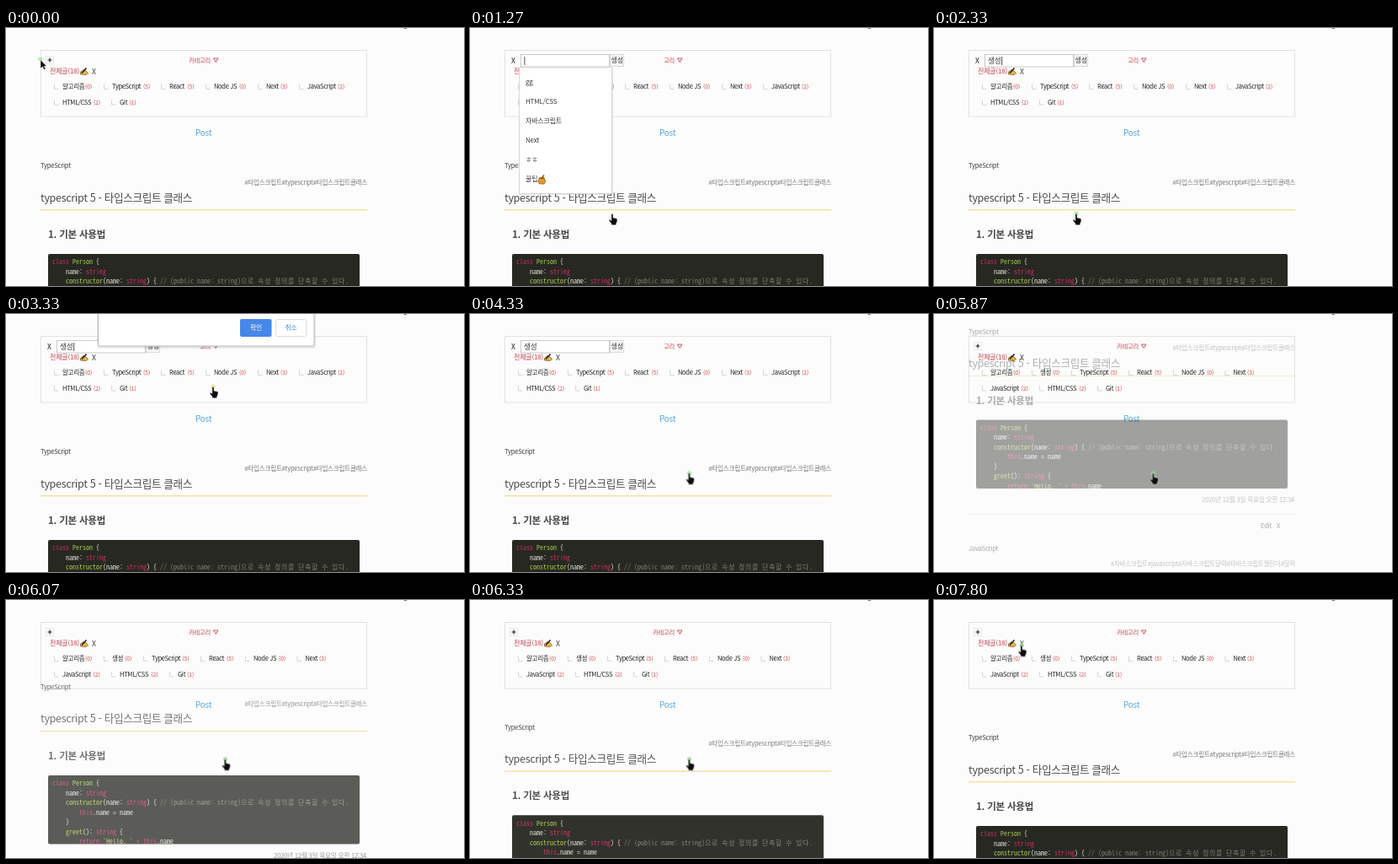
Animation of 544x306 px, one loop 8 s. Source, as an HTML page:

```html
<!DOCTYPE html>
<html lang="ko">
<head>
<meta charset="utf-8">
<title>Blog categories</title>
<style>
  html, body { margin: 0; width: 100%; height: 100%; overflow: hidden; background: #fcfcfc; }
  svg { display: block; width: 544px; height: 306px; }
  text { font-family: "Noto Sans CJK KR", "Noto Sans KR", "Noto Sans CJK", "Noto Sans", sans-serif; white-space: pre; }
  .code text { font-family: "Noto Sans Mono CJK KR", "Noto Sans Mono", monospace; }
</style>
</head>
<body>
<svg id="stage" viewBox="0 0 544 306"></svg>
<script>
const LOOP = 8000;
const RELOAD = 5470, READY = 5600;
const INK = '#3a3a3a', RED = '#c9434f', BLUE = '#5aa6d2', GREY = '#777', EDGE = '#e2e2e2';
const stage = document.getElementById('stage');

function add(parent, tag, attrs = {}) {
  const el = document.createElementNS('http://www.w3.org/2000/svg', tag);
  for (const k in attrs) el.setAttribute(k, attrs[k]);
  parent.append(el);
  return el;
}
const group = (parent, attrs) => add(parent, 'g', attrs);
const rect = (g, x, y, width, height, fill, more) =>
  add(g, 'rect', { x, y, width, height, fill, ...more });
const path = (g, d, attrs) => add(g, 'path', { d, fill: 'none', ...attrs });
const rule = (g, x1, x2, y, stroke) => path(g, `M${x1} ${y}H${x2}`, { stroke });

// Text placed by the vertical middle of its capitals
function text(g, x, cy, str, size = 7.5, fill = INK, more = {}) {
  const el = add(g, 'text', {
    x, y: cy + size * 0.36, 'font-size': size, fill, 'letter-spacing': -0.2, ...more });
  el.textContent = str;
  return el;
}

function play(el, prop, steps) {
  el.animate(
    steps.map(([ms, value, easing = 'linear']) => ({ offset: ms / LOOP, [prop]: value, easing })),
    { duration: LOOP, iterations: Infinity });
}
function show(el, ...spans) {
  const steps = spans[0][0] > 0 ? [[0, 0, 'step-end']] : [];
  for (const [from, to] of spans) {
    steps.push([from, 1, 'step-end']);
    steps.push(to < LOOP ? [to, 0, 'step-end'] : [LOOP, 1]);
  }
  if (steps[steps.length - 1][0] < LOOP) steps.push([LOOP, 0]);
  play(el, 'opacity', steps);
  return el;
}
const PAGE = [[0, RELOAD], [READY, LOOP]];

// Category box
const box = show(group(stage), ...PAGE);
path(box, 'M471 -2Q474 2.500 477 -1', { stroke: '#777', 'stroke-width': 1.2 });
rect(box, 41.5, 26.5, 387, 78.5, '#fcfcfc', { stroke: EDGE });
rect(box, 47.5, 33.5, 9, 9, '#fff', { stroke: EDGE, 'stroke-width': 0.7 });
path(box, 'M49.500 38H54.500M52 35.500V40.500', { stroke: '#222', 'stroke-width': 1.2 });
text(box, 217, 38.5, '카테고리', 7.3, RED);
path(box, 'M246.500 36H252L249.250 40.500Z', { stroke: RED, 'stroke-width': 0.9 });
text(box, 52, 51.5, '전체글(18)', 8, RED);
path(box, 'M88.500 55V52L92 49.500L95 51L97.500 53.500L95 55.500Z', { fill: '#f2b632', stroke: '#4a3a18', 'stroke-width': 0.6 });
path(box, 'M90 53.500L95.500 47.500', { stroke: '#222', 'stroke-width': 1.7 });
text(box, 102, 52, 'X', 8.5);
text(box, 225, 124.5, 'Post', 9.8, BLUE);

// Each entry: name x, name, count x, count
function entries(spans, rows) {
  const g = show(group(stage), ...spans);
  rows.forEach((row, i) => {
    const cy = 69.5 + i * 18.5;
    for (const [x, name, countX, count] of row) {
      path(g, `M${x - 9.5} ${cy - 3}v6h5`, { stroke: '#ccc', 'stroke-width': 0.8 });
      text(g, x, cy, name, 7.5, '#222', { 'letter-spacing': -0.3 });
      text(g, countX, cy + 0.3, `(${count})`, 6.6, RED, { 'letter-spacing': 0 });
    }
  });
}
entries([[0, RELOAD]], [
  [[67, '알고리즘', 94, 0], [126, 'TypeScript', 163, 5], [194, 'React', 215.5, 5],
   [247, 'Node JS', 277, 0], [309, 'Next', 326, 3], [358, 'JavaScript', 394, 2]],
  [[67, 'HTML/CSS', 104, 2], [135, 'Git', 146.5, 1]]]);
entries([[READY, LOOP]], [
  [[67, '알고리즘', 94, 0], [126, '생성', 141, 0], [173, 'TypeScript', 209.5, 5],
   [241, 'React', 262, 5], [294, 'Node JS', 324, 0], [355.5, 'Next', 372, 3]],
  [[67, 'JavaScript', 103.5, 2], [135, 'HTML/CSS', 172.5, 2], [204, 'Git', 215, 1]]]);

// Loading view
const loading = show(group(stage), [RELOAD, READY]);
path(loading, 'M518 -2Q521 2.500 524 -1', { stroke: '#777', 'stroke-width': 1.2 });
rule(loading, 0, 544, 15.5, EDGE);
rule(loading, 0, 544, 130, EDGE);
text(loading, 235, 46, 'Muse_Shelf', 15.1, BLUE, { 'text-anchor': 'middle', 'letter-spacing': 0 });
text(loading, 214, 92, 'today:', 7, RED);
text(loading, 240, 92, 'total:', 7, RED);
text(loading, 235, 103.5, 'Copyright ©2020', 8.7, BLUE, { 'text-anchor': 'middle' });
const spinner = path(loading, 'M241.500 271.500A10 10 0 0 1 241.500 286.500',
  { stroke: '#dadada', 'stroke-width': 6 });
spinner.style.transformOrigin = '235px 279px';
play(spinner, 'transform', [[0, 'rotate(0deg)'], [RELOAD, 'rotate(0deg)'],
  [RELOAD + 1000, 'rotate(360deg)'], [LOOP, 'rotate(360deg)']]);

// Posts
const posts = group(stage);
const right = { 'text-anchor': 'end' };
text(posts, 41, 163.5, 'TypeScript', 7.6);
text(posts, 429, 183, '#타입스크립트#typescript#타입스크립트클래스', 7.5, GREY, right);
text(posts, 41, 201, 'typescript 5 - 타입스크립트 클래스', 12.6, '#4c4c4c', { 'letter-spacing': -0.35 });
rule(posts, 41, 429, 215.8, '#f0d27c');
text(posts, 50, 245, '1. 기본 사용법', 11.5, '#484848', { 'font-weight': 700 });
const code = group(posts, { class: 'code' });
rect(code, 50, 268, 370, 81.5, '#272822', { rx: 2 });
const W = '#e4e4de', P = '#c92f62', G = '#a9cc52', Y = '#cfc67a', C = '#7f7c70';
[
  [[0, 'class', P], [6, 'Person', G], [13, '{', W]],
  [[4, 'name:', W], [10, 'string', P]],
  [[4, 'constructor', G], [15, '(name:', W], [22, 'string', P], [28, ') {', W],
   [32, '// (public name: string)', C], [56, '으로', C], [61, '속성', C],
   [66, '정의를', C], [73, '단축할', C], [80, '수', C], [83, '있다.', C]],
  [[8, 'this', P], [12, '.name = name', W]],
  [[4, '}', W]],
  [[4, 'greet', G], [9, '():', W], [13, 'string', P], [20, '{', W]],
  [[8, 'return', P], [15, '`Hello, `', Y], [25, '+', P], [27, 'this', P], [31, '.name', W]],
].forEach((line, i) => {
  for (const [col, str, fill] of line)
    text(code, 55 + col * 4, 277.5 + i * 11.5, str, 8, fill,
      { 'letter-spacing': /[가-힣]/.test(str) ? 0.64 : 0 });
});
text(posts, 428, 363, '2020년 12월 3일 목요일 오전 12:34', 7.6, GREY, right);
rule(posts, 41, 429, 379.5, '#e4e4e4');
text(posts, 388, 393.5, 'Edit', 7.5);
text(posts, 407, 393.5, 'X', 7.5);
text(posts, 41, 420.5, 'JavaScript', 7.6);
text(posts, 429, 439, '#자바스크립트#javascript#자바스크립트달력#자바스크립트캘린더#달력', 7.5, GREY, right);
const IN = 5611;
play(posts, 'opacity', [[0, 1], [RELOAD, 1], [RELOAD, 0], [IN, 0, 'ease'], [IN + 1000, 1], [LOOP, 1]]);
play(posts, 'transform', [[0, 'translate(0px, 0px)'], [RELOAD, 'translate(0px, 0px)'],
  [RELOAD, 'translate(0px, -250px)'], [IN, 'translate(0px, -250px)', 'ease'],
  [IN + 1000, 'translate(0px, 0px)'], [LOOP, 'translate(0px, 0px)']]);

// New category form
const form = show(group(stage), [450, RELOAD]);
rect(form, 47, 30, 183, 17, '#fcfcfc');
text(form, 49, 39, 'X', 8.5, '#222', { 'font-weight': 500 });
rect(form, 60.5, 31.5, 105, 14.5, '#fff', { stroke: '#bbb', 'stroke-width': 0.8 });
rect(form, 166.5, 31.5, 16, 14, '#f6f6f6', { stroke: '#d4d4d4', 'stroke-width': 0.8 });
text(form, 167.5, 38.5, '생성', 8);

function typed(str, from, to, ...blink) {
  text(show(group(form), [from, to]), 64, 38.7, str, 8.6);
  const caret = rect(form, 64.5 + str.length * 7.9, 34, 0.8, 10, '#222');
  show(caret, ...(blink.length ? blink : [[from, to]]));
}
typed('', 800, 1670, [800, 1400]);
typed('ㅅ', 1670, 1800);
typed('새', 1800, 1930);
typed('생', 1930, 2070);
typed('생ㅅ', 2070, 2200);
typed('생서', 2200, 2330);
typed('생성', 2330, RELOAD, [2330, 4330], [4800, 5270]);

const list = show(group(stage), [800, 1670]);
rect(list, 59, 48, 111, 150, '#000', { opacity: 0.07 });
rect(list, 58.5, 47, 110, 149.5, '#fff', { stroke: '#cfcfcf', 'stroke-width': 0.8 });
['gg', 'HTML/CSS', '자바스크립트', 'Next', 'ㅎㅎ', '꿀팁'].forEach((word, i) =>
  text(list, 66, 64.5 + i * 23, word, 8, INK));
path(list, 'M82 178.500H88.500Q91 182 88 185H82.500Q79.500 182 82 178.500Z', { fill: '#e39a2d', stroke: '#8a5018', 'stroke-width': 0.6 });
path(list, 'M82 178H88.500M85.500 177.500L88 174.500', { stroke: '#8a5018', 'stroke-width': 1.4 });

// Confirm dialog
const dialog = show(group(stage), [2900, 3870]);
rect(dialog, 108, -6, 260, 47, '#000', { rx: 3, opacity: 0.08 });
rect(dialog, 109.5, -6, 256.5, 44, '#fff', { rx: 2, stroke: '#b8b8b8' });
rect(dialog, 278, 6, 37.5, 21, '#4687e8', { rx: 2 });
rect(dialog, 320.5, 6.5, 36, 20, '#fff', { rx: 2, stroke: '#dadce0' });
text(dialog, 297, 16.5, '확인', 7.8, '#fff', { 'text-anchor': 'middle' });
text(dialog, 338.5, 16.5, '취소', 7.8, '#4687e8', { 'text-anchor': 'middle' });

// Pointer
const pointer = group(stage);
const dot = add(pointer, 'circle', { r: 2.6, fill: '#8ee28a', 'fill-opacity': 0.7 });
play(dot, 'fill', [[0, '#8ee28a', 'step-end'], [2900, '#e6e070', 'step-end'],
  [3870, '#8ee28a', 'step-end'], [LOOP, '#8ee28a']]);
show(dot, [0, 1070], [1670, LOOP]);
const arrow = path(pointer, 'M0 1V11L2.500 8.800L4.300 12.500L6 11.700L4.300 8.200H7.300Z',
  { fill: '#111', stroke: '#fff', 'stroke-width': 0.4 });
show(arrow, [0, 250]);
const hand = path(pointer,
  'M-1.200 1Q0 -0.600 1 1V5L4.500 5.700Q6 6 6 7.500Q6 10.500 4.600 12V13.800H-1V12.200L-3.800 8.500Q-4 6.800 -2.300 7.400L-1.200 8.400Z',
  { fill: '#0c0c0c', stroke: '#fff', 'stroke-width': 0.5 });
show(hand, [250, LOOP]);
const go = 'ease-in-out';
play(pointer, 'transform', [
  [0, 41, 37], [70, 41, 37, go], [300, 52, 38], [450, 52, 38, go], [700, 80, 40],
  [1070, 80, 40, go], [1270, 169, 220], [2530, 169, 220, go], [2780, 175, 38],
  [3000, 175, 38, go], [3330, 246, 86, go], [3630, 297, 17], [3830, 297, 17, go],
  [4200, 260.5, 188.5], [6750, 260.5, 188.5, go], [7700, 104, 53.5], [LOOP, 104, 53.5],
].map(([ms, x, y, easing]) => [ms, `translate(${x}px, ${y}px)`, easing]));
</script>
</body>
</html>
```
